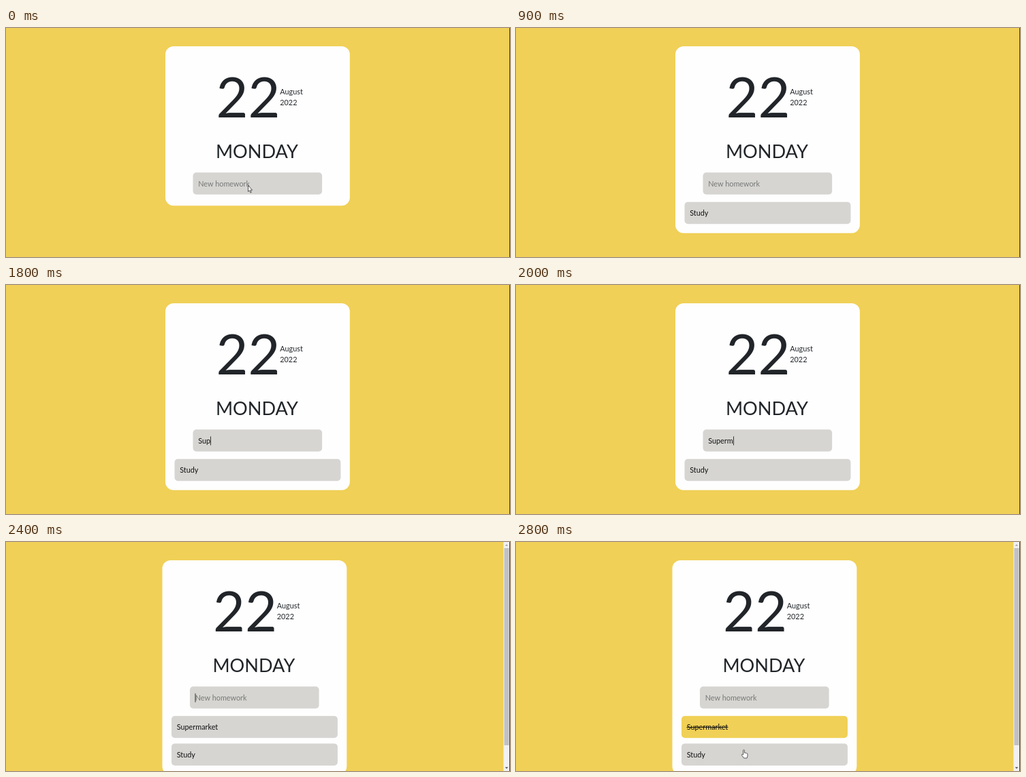
Recreate the animation shown at these times as an HTML page with a canvas. Size 740 by 338 pixels, loop 2.9 s.

```html
<!DOCTYPE html>
<html lang="en">
<head>
<meta charset="utf-8">
<title>Homework list</title>
<style>
  html, body { margin: 0; width: 100%; height: 100%; overflow: hidden; background: #f0d056; }
  canvas { display: block; width: 740px; height: 338px; }
</style>
</head>
<body>
<canvas id="stage" width="740" height="338"></canvas>
<script>
const ctx = document.getElementById('stage').getContext('2d');
const LOOP = 2900;
const YELLOW = '#f0d056', GREY = '#d6d5d2', INK = '#212529';
const FONT = 'Lato, "Open Sans", sans-serif';
const BODY = 10.84;

// Each step overrides the state left by the earlier ones.
const steps = [
  { at: 0, typed: '', caret: false, items: [], done: false, arrow: true, hand: null },
  { at: 200, caret: true, arrow: false },
  { at: 500, typed: 'S' },
  { at: 900, typed: '', caret: false, items: ['Study'] },
  { at: 1000, caret: true },
  { at: 1200, caret: false },
  { at: 1400, typed: 'S', caret: true },
  { at: 1600, typed: 'Su' },
  { at: 1800, typed: 'Sup' },
  { at: 1900, typed: 'Super' },
  { at: 2000, typed: 'Superm' },
  { at: 2100, typed: 'Superma' },
  { at: 2200, typed: 'Supermark' },
  { at: 2300, typed: 'Supermarket' },
  { at: 2400, typed: '', items: ['Supermarket', 'Study'] },
  { at: 2700, caret: false, done: true, hand: [331, 272] },
  { at: 2800, hand: [331, 306] }
];

function stateAt(t) {
  return Object.assign({}, ...steps.filter(s => s.at <= t));
}

function box(x, y, w, h, r, color) {
  ctx.fillStyle = color;
  ctx.beginPath();
  ctx.roundRect(x, y, w, h, r);
  ctx.fill();
}

function label(str, x, y, size, color) {
  ctx.font = size + 'px ' + FONT;
  ctx.fillStyle = color;
  ctx.fillText(str, x, y);
  return ctx.measureText(str).width;
}

function outline(path) {
  ctx.fillStyle = '#fff';
  ctx.strokeStyle = '#333';
  ctx.lineWidth = 0.8;
  ctx.lineJoin = 'round';
  ctx.fill(path);
  ctx.stroke(path);
}

const arrowPath = new Path2D('M0 0V9L2 7.2L3.4 10.6L4.8 10L3.4 6.7H6.2Z');
const handPath = new Path2D(
  'M2.6 8V1.2Q3.5 0 4.4 1.2V5.2Q5.3 4.6 6 5.5Q7 5 7.5 6Q8.8 5.7 9 7V10' +
  'L8 13H3.6L.4 8.6Q.2 7.2 1.5 7.4Z');

function pointer(path, x, y) {
  ctx.save();
  ctx.translate(x, y);
  outline(path);
  ctx.restore();
}

function triangle(x, y, dir, color) {
  ctx.fillStyle = color;
  ctx.beginPath();
  ctx.moveTo(x - 2.2, y + dir * 1.2);
  ctx.lineTo(x + 2.2, y + dir * 1.2);
  ctx.lineTo(x, y - dir * 1.2);
  ctx.fill();
}

function scrollbar() {
  box(730.5, 0, 9.5, 338, 0, '#f1f1f1');
  box(731.5, 9, 7, 291, 0, '#c1c1c1');
  triangle(735, 4.5, 1, '#a3a3a3');
  triangle(735, 333.5, -1, '#505050');
}

function inputField(s) {
  box(274.5, 213.2, 189.6, 32.5, 5, GREY);
  let x = 282.2;
  if (s.typed) x += label(s.typed, x, 234, BODY, '#111');
  else label('New homework', x, 234, BODY, '#777876');
  if (s.caret) box(Math.round(x), 223.5, 1, 13, 0, '#333');
}

function item(name, i, done) {
  const y = 256.8 + i * 40.6;
  box(247.5, y, 243.9, 32.5, 5, done ? YELLOW : GREY);
  const w = label(name, 255.2, y + 20.6, BODY, '#111');
  if (done) box(255, y + 16.2, w + 0.4, 1, 0, '#111');
}

function draw(s) {
  const long = s.items.length > 1;
  box(0, 0, 740, 338, 0, YELLOW);

  ctx.save();
  if (long) ctx.translate(-4.5, 0);
  box(234, 27, 270.8, 235.2 + s.items.length * 40.6, 12, '#fefefe');
  label('22', 308.4, 132, 81, INK);
  label('August', 402.3, 97.6, BODY, INK);
  label('2022', 402.3, 113.9, BODY, INK);
  label('MONDAY', 307.9, 192.4, 27.1, INK);
  inputField(s);
  s.items.forEach((name, i) => item(name, i, s.done && i === 0));
  ctx.restore();

  if (long) scrollbar();
  box(739, 0, 1, 338, 0, '#4a4630');
  if (s.arrow) pointer(arrowPath, 355.5, 232.5);
  if (s.hand) pointer(handPath, ...s.hand);
}

const start = performance.now();
function tick() {
  draw(stateAt((performance.now() - start) % LOOP));
  requestAnimationFrame(tick);
}
tick();
</script>
</body>
</html>
```
